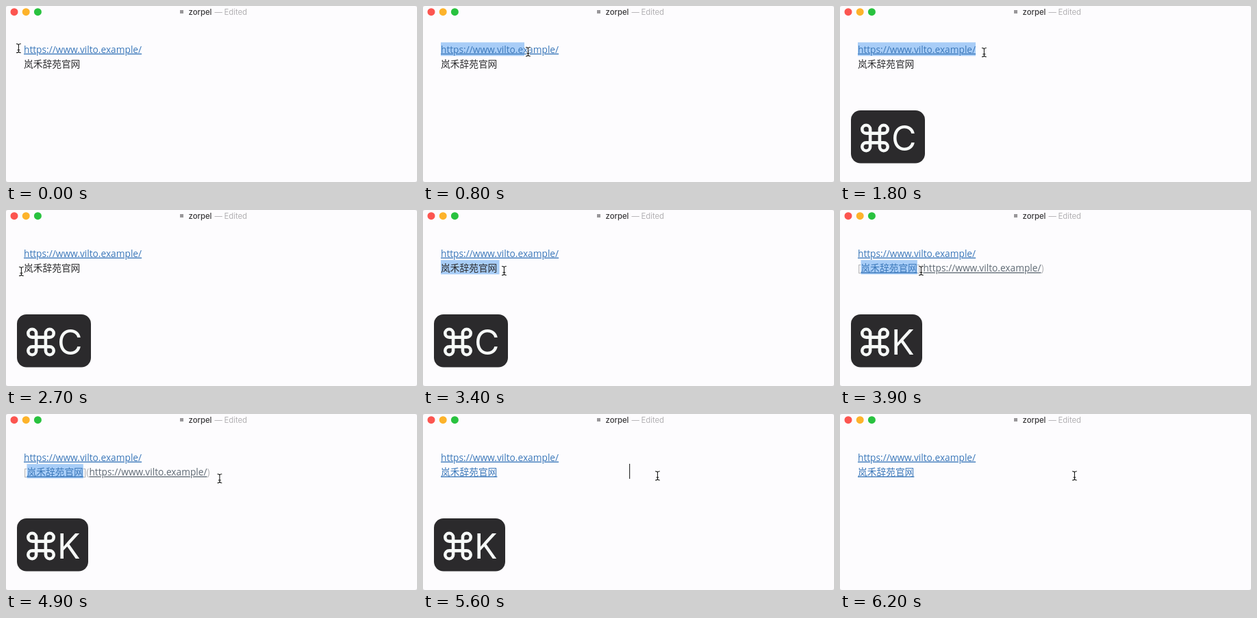
Write an HTML page that moves like this. It is 600 px wide and 258 px high and loops after 6.3 s.

```html
<!DOCTYPE html>
<html lang="en">
<head>
<meta charset="utf-8">
<title>Turning text into a link</title>
<style>
  html, body { margin: 0; width: 100%; height: 100%; overflow: hidden; background: #d8d7d9; }
  svg { display: block; width: 600px; height: 258px; }
  .body { font: 13.73px "Open Sans", "Noto Sans CJK SC", "Noto Sans CJK", sans-serif; fill: #2c2c2e; }
  .title { font: 11.3px Inter, sans-serif; fill: #b2b0b3; }
  .link { fill: #3b78ba; text-decoration: underline; }
  .address { fill: #5f6a74; text-decoration: underline; }
  .mark { fill: #b5b5b8; }
  .selection { fill: #a8cdf7; }
  .key { font: 50px Inter, sans-serif; fill: #f6f9f7; }
  .stroke { fill: none; stroke: #f6f9f7; stroke-width: 4.6; }
</style>
</head>
<body>
<svg viewBox="0 0 600 258">
  <rect width="600" height="258" rx="3" fill="#fdfcfe"/>
  <circle cx="12" cy="8.7" r="5.5" fill="#fc5550"/>
  <circle cx="29.2" cy="8.7" r="5.5" fill="#fdb32b"/>
  <circle cx="46.4" cy="8.7" r="5.5" fill="#29c23f"/>
  <rect x="254" y="6" width="5" height="5" fill="#99979a"/>
  <g class="title">
    <text x="266.5" y="13" font-weight="500" style="fill:#39383a">zorpel</text>
    <text x="304.5" y="13">—</text>
    <text x="318.5" y="13">Edited</text>
  </g>

  <rect id="urlSelection" class="selection" x="26" y="53.3" height="19.9"/>
  <rect id="nameSelection" class="selection" y="73.3" height="21"/>
  <g class="body">
    <text x="26" y="68.7" class="link">https://www.vilto.example/</text>
    <text id="plain" x="26" y="90.3">岚禾辞苑官网</text>
    <text id="markdown" x="26" y="90.3"><tspan class="mark">[</tspan><tspan class="link">岚禾辞苑官网</tspan><tspan class="mark">](</tspan><tspan class="address">https://www.vilto.example/</tspan><tspan class="mark">)</tspan></text>
    <text id="linked" x="26" y="90.3" class="link">岚禾辞苑官网</text>
  </g>
  <rect id="caret" x="301" y="73" width="1.2" height="22" fill="#333"/>

  <g id="popup">
    <rect id="plate" x="16" y="153" height="77.5" rx="14" fill="#2b2a2c"/>
    <path id="command" class="stroke" transform="translate(51 193.5)"/>
    <text id="letter" class="key" x="75" y="212"></text>
  </g>

  <g id="pointer" fill="none" stroke-linecap="round">
    <path id="halo" stroke="#fff" stroke-width="2.4"/>
    <path id="beam" stroke="#111" stroke-width="1.05"/>
  </g>
</svg>
<script>
const LOOP = 6300, STEP = 100;
const $ = id => document.getElementById(id);
const clamp = (v, lo, hi) => Math.min(hi, Math.max(lo, v));
const show = (id, visible) => $(id).setAttribute('visibility', visible ? 'visible' : 'hidden');
const set = (id, attributes) => {
  for (const name in attributes) $(id).setAttribute(name, attributes[name]);
};

// Pointer path: time, x, y
const path = [
  [0, 18, 62], [400, 18, 62], [500, 32, 63], [800, 153, 67], [900, 177, 68],
  [1000, 192, 68], [1200, 210, 68], [1800, 210, 68], [2100, 192, 76],
  [2400, 90, 97], [2700, 22, 90], [2800, 27, 89], [3000, 112, 89],
  [3100, 150, 89], [3200, 118, 89], [4000, 118, 89], [4100, 126, 90],
  [4700, 281, 93], [5100, 342, 96], [5300, 342, 90.5], [LOOP, 342, 90.5]
];

function pointerAt(t) {
  const i = path.findIndex(key => key[0] > t);
  const [t0, x0, y0] = path[i - 1], [t1, x1, y1] = path[i];
  const k = (t - t0) / (t1 - t0);
  return [x0 + (x1 - x0) * k, y0 + (y1 - y0) * k];
}

function render(t) {
  const [x, y] = pointerAt(t);
  const within = (from, to) => t >= from && t < to;
  set('pointer', { transform: `translate(${x + 0.4} ${y})` });

  const urlEnd = t < 1200 ? clamp(x - 5, 26, 198) : 198;
  set('urlSelection', { width: urlEnd - 26 });
  show('urlSelection', within(500, 2600));

  const expanded = within(3600, 5500);
  const start = expanded ? 30.5 : 26;
  const end = expanded ? 112.8 : clamp(x - 5, 26, 111.5);
  set('nameSelection', { x: start, width: end - start });
  show('nameSelection', within(2800, 5100));

  show('plain', t < 3600);
  show('markdown', expanded);
  show('linked', t >= 5500);
  show('caret', within(5100, 5700));

  const copying = t < 3600;
  $('letter').textContent = copying ? 'C' : 'K';
  set('plate', { width: copying ? 108 : 104 });
  set('popup', { opacity: clamp((5900 - t) / 300, 0, 1) });
  show('popup', within(1600, 5900));
}

// Looped square: four bars, each ending in a three-quarter circle
const a = 6.9, r = 5.9, b = a + r, loop = `A${r} ${r} 0 1 0 `;
set('command', {
  d: `M${-b} ${-a}H${b}${loop}${a} ${-b}V${b}${loop}${b} ${a}` +
     `H${-b}${loop}${-a} ${b}V${-b}${loop}${-b} ${-a}Z`
});
const beam = 'M-3 -6.5Q0 -6.5 0 -4.5Q0 -6.5 3 -6.5M0 -4.5V4.5M-3 6.5Q0 6.5 0 4.5Q0 6.5 3 6.5M-1.5 2.5H1.5';
set('halo', { d: beam });
set('beam', { d: beam });

const begin = performance.now();
function tick() {
  const t = (performance.now() - begin) % LOOP;
  render(Math.floor(t / STEP) * STEP);
  requestAnimationFrame(tick);
}
tick();
</script>
</body>
</html>
```
